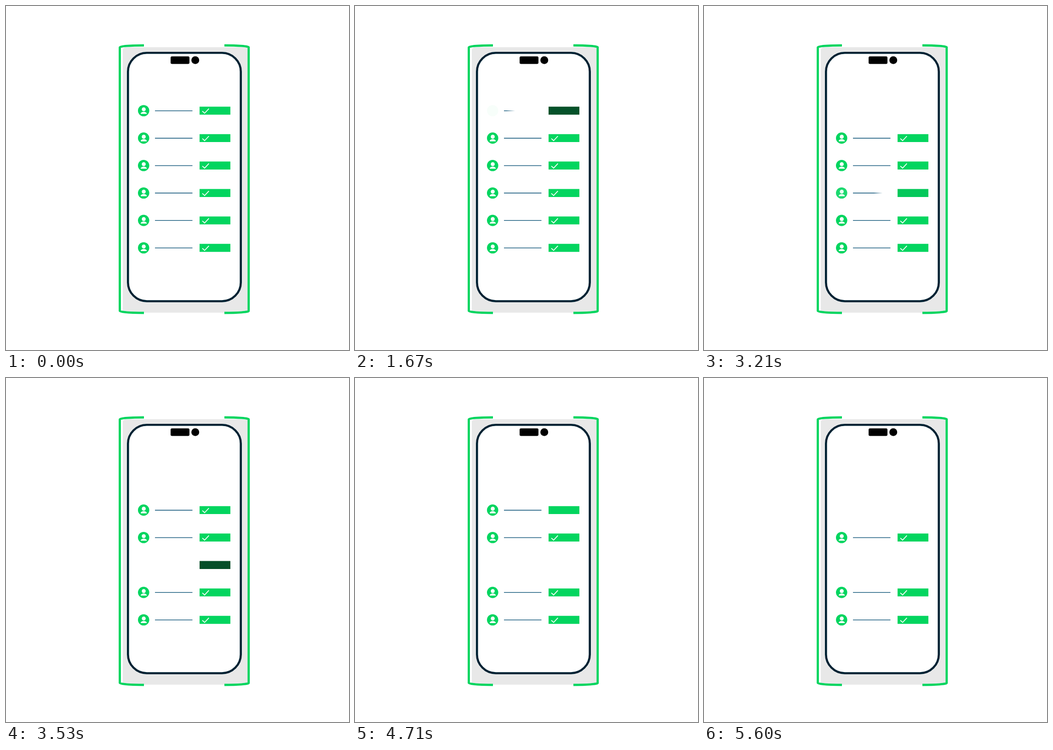
These frames come from a looping animation (746 by 751 pixels, 5.97 s). An HTML page with a canvas:

```html
<!DOCTYPE html>
<html lang="en">
<head>
<meta charset="utf-8">
<title>Checklist</title>
<style>
html, body { margin: 0; width: 100%; height: 100%; overflow: hidden; background: #fff; }
canvas { display: block; }
</style>
</head>
<body>
<canvas id="stage" width="746" height="751"></canvas>
<script>
const ctx = document.getElementById('stage').getContext('2d');
const LOOP = 5970, ROWS = 6, WIPE = 500, SOFT = 19;
const GREEN = [3, 213, 95], DARK = [5, 78, 40];

// Row index -> when its check goes, when its fade ends, when its bar goes
const exits = {
  0: { check: 1310, end: 1790, bar: 2160 },
  3: { check: 3010, end: 3530, bar: 3900 },
  1: { check: 4710, end: 5230, bar: 5600 }
};

const clamp = v => Math.min(1, Math.max(0, v));
const smooth = v => v * v * (3 - 2 * v);
const rgb = c => `rgb(${c.map(Math.round)})`;
const mix = (a, b, k) => a.map((v, i) => v + (b[i] - v) * k);

function fill(path, color) {
  ctx.fillStyle = color;
  ctx.fill(path);
}

function stroke(path, color, width) {
  ctx.strokeStyle = color;
  ctx.lineWidth = width;
  ctx.stroke(path);
}

function box(x, y, w, h, r) {
  const p = new Path2D();
  p.roundRect(x, y, w, h, r);
  return p;
}

function disc(x, y, r) {
  const p = new Path2D();
  p.arc(x, y, r, 0, 7);
  return p;
}

const shade = box(254, 90, 273, 579.5, 6);
const brackets = new Path2D(
  'M300 86A52.5 4 0 0 0 247.5 90V666A52.5 4 0 0 0 300 670' +
  'M475 86A52.5 4 0 0 1 527.8 90V666A52.5 4 0 0 1 475 670');
const phone = box(265.3, 102.3, 245.4, 542.2, 41);
const island = box(358, 110, 41, 16.5, 3);
const lens = disc(411.7, 118.3, 8.5);
const badge = disc(299.3, 0, 12.3);
const head = disc(299.6, -3, 4.3);
const torso = new Path2D('M293 7C293 4 296 2.4 299.6 2.4S306.2 4 306.2 7Z');
const rule = new Path2D('M324 0.2H405.5');
const bar = box(421, -8.7, 67, 17.4, 0);
const tick = new Path2D('M427 1L432 5.6L441.3 -4.4');

function drawFrame() {
  fill(shade, '#e8e8e8');
  stroke(brackets, rgb(GREEN), 4.8);
  fill(phone, '#fff');
  stroke(phone, '#002233', 4.6);
  fill(island, '#000');
  fill(lens, '#000');
}

function drawRow(i, t) {
  const exit = exits[i] || { check: LOOP, end: 2 * LOOP, bar: LOOP };
  if (t >= exit.bar) return;
  const p = clamp((t - exit.end + WIPE) / WIPE);
  const fade = smooth(clamp((p - .25) / .57));

  ctx.save();
  ctx.translate(0, 228.5 + i * 59.9);

  ctx.globalAlpha = 1 - fade;
  fill(badge, rgb(GREEN));
  fill(head, '#fff');
  fill(torso, '#fff');
  ctx.globalAlpha = 1;

  if (p < 1) {
    const edge = 405.5 + SOFT - p * (81.5 + SOFT);
    const ink = ctx.createLinearGradient(edge - SOFT, 0, edge, 0);
    ink.addColorStop(0, 'rgba(27,93,127,1)');
    ink.addColorStop(1, 'rgba(27,93,127,0)');
    stroke(rule, ink, 1.6);
  }

  fill(bar, rgb(mix(GREEN, DARK, fade)));
  if (t < exit.check) stroke(tick, '#fff', 1.8);
  ctx.restore();
}

function draw(now) {
  const t = now % LOOP;
  ctx.fillStyle = '#fff';
  ctx.fillRect(0, 0, 746, 751);
  drawFrame();
  for (let i = 0; i < ROWS; i++) drawRow(i, t);
}

let start;
function tickLoop(now) {
  start ??= now;
  draw(now - start);
  requestAnimationFrame(tickLoop);
}
requestAnimationFrame(tickLoop);
</script>
</body>
</html>
```
